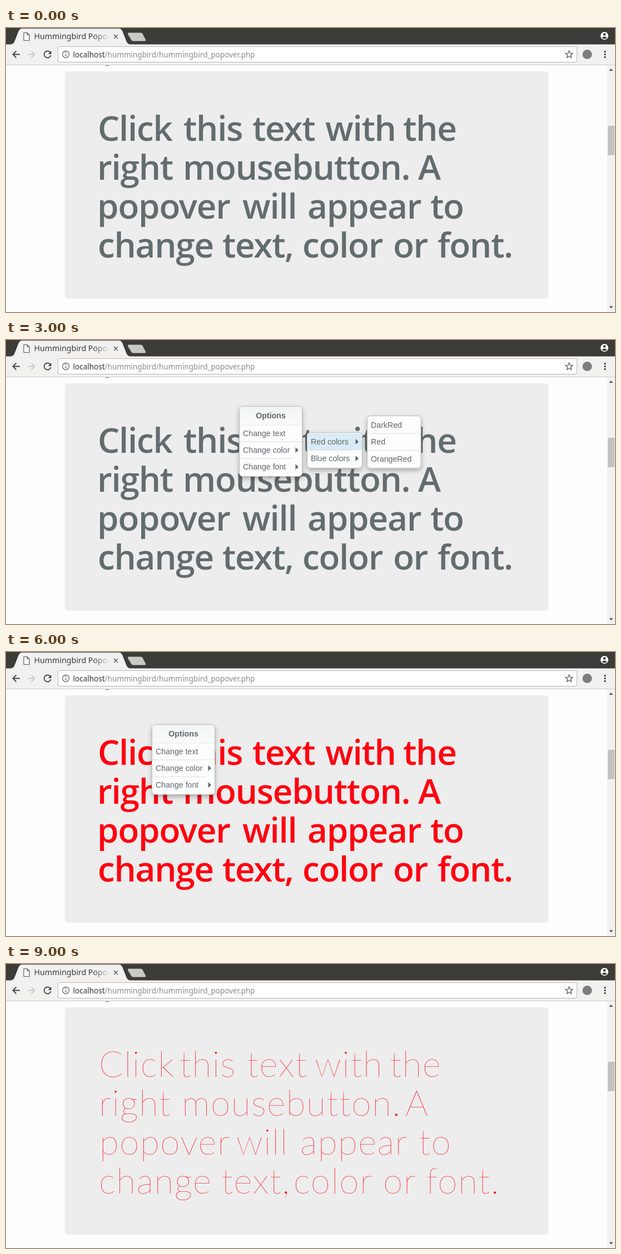
Write an HTML page that moves like this. It is 1095x511 px and loops after 10 s.

```html
<!DOCTYPE html>
<html lang="en">
<head>
<meta charset="utf-8">
<title>Popover demo</title>
<style>
  html, body { margin: 0; width: 100%; height: 100%; overflow: hidden; background: #fcfefd; }
  svg { display: block; width: 100%; height: 100%; }
  text { white-space: pre; }
  .ui { font-family: "Noto Sans", "Open Sans", sans-serif; }
  .menu text { font: 14.2px "Liberation Sans", Arial, sans-serif; fill: #60676b; }
  .menu .title { font-weight: 700; text-anchor: middle; }
  .medium { font: 600 62px "Open Sans", "Noto Sans", sans-serif; letter-spacing: -1.25px; }
  .thin { font: 100 64px Lato, "Noto Sans", sans-serif; letter-spacing: 1.5px; }
</style>
</head>
<body>
<svg id="stage" viewBox="0 0 1095 511" xmlns="http://www.w3.org/2000/svg">
  <defs>
    <linearGradient id="fade" gradientUnits="userSpaceOnUse" x1="158" y1="0" x2="187" y2="0">
      <stop offset="0" stop-color="#3a3a3a"/>
      <stop offset="1" stop-color="#3a3a3a" stop-opacity="0"/>
    </linearGradient>
    <linearGradient id="head" x1="0" y1="0" x2="0" y2="1">
      <stop offset="0" stop-color="#f3f4f4"/>
      <stop offset="1" stop-color="#f9fafa"/>
    </linearGradient>
    <filter id="drop" x="-20%" y="-20%" width="140%" height="150%">
      <feDropShadow dx="0" dy="4" stdDeviation="4" flood-color="#000" flood-opacity=".28"/>
    </filter>
    <filter id="soft" x="-100%" y="-50%" width="300%" height="200%">
      <feGaussianBlur stdDeviation="13"/>
    </filter>
  </defs>

  <!-- page -->
  <rect width="1095" height="511" fill="#fcfefd"/>
  <path d="M178 66.5q4 2 8 0" fill="none" stroke="#858b8e" stroke-width="1.5"/>
  <rect x="105.5" y="78" width="870" height="409" rx="6" fill="#ededed"/>
  <rect id="edge" x="-60" y="398" width="66" height="160" fill="#000" filter="url(#soft)"/>
  <g id="medium" class="medium"></g>
  <g id="thin" class="thin"></g>
  <g id="menus" class="menu"></g>

  <!-- scrollbar -->
  <rect x="1081" y="67" width="14" height="444" fill="#f1f1f1"/>
  <rect x="1082" y="176" width="12" height="53" fill="#c1c1c1"/>
  <path d="M1084.5 77h7l-3.500-4zM1084.5 500.500h7l-3.500 4z" fill="#505050"/>

  <!-- tab strip -->
  <rect width="1095" height="30" fill="#3d3c38"/>
  <path d="M8 30Q13 29 15 25L23 5Q25 1 29 1H203Q207 1 209 5L217 25Q219 29 224 30Z" fill="#f2f1f0"/>
  <path d="M221 8.500H242Q245 8.500 246 11L251 21Q252 23.500 249 23.500H229Q226 23.500 225 21L219 11Q218 8.500 221 8.500Z" fill="#cbc9c6"/>
  <path d="M32 8.500h6l4 4v10h-10zM38 8.500v4h4" fill="#fff" stroke="#5a5a5a" stroke-width="1.200"/>
  <text class="ui" x="50.500" y="20" font-size="14.2" fill="url(#fade)">Hummingbird Popo</text>
  <path d="M194 12l7 7m0-7l-7 7" stroke="#5a5a5a" stroke-width="1.400"/>
  <circle cx="1076" cy="14" r="7" fill="#fff"/>
  <circle cx="1076" cy="11.500" r="2.300" fill="#3d3c38"/>
  <path d="M1071.500 17.500q4.500-4 9 0q-4.500 4-9 0" fill="#3d3c38"/>

  <!-- toolbar -->
  <rect y="29.500" width="1095" height="36.500" fill="#f2f1f0"/>
  <rect y="66" width="1095" height="1" fill="#cfcecc"/>
  <g fill="none" stroke="#4a4a4a" stroke-width="1.900">
    <path d="M25 47.500H13M18.500 41.500l-6 6 6 6"/>
    <path d="M39 47.500H51M45.500 41.500l6 6-6 6" stroke="#cccac8"/>
    <path d="M79.500 44A6 6 0 1 0 80.500 49"/>
  </g>
  <path d="M81.500 41v6h-6z" fill="#4a4a4a"/>
  <rect x="93.500" y="33.500" width="933" height="28" rx="2.500" fill="#fff" stroke="#b8b6b3"/>
  <circle cx="107.500" cy="47.500" r="6" fill="none" stroke="#666" stroke-width="1.300"/>
  <path d="M107.500 46.500v4.500M107.500 43.500v1.600" stroke="#666" stroke-width="1.500"/>
  <text class="ui" x="120.500" y="53" font-size="13.5" fill="#333">localhost<tspan fill="#8b8b8b">/hummingbird/hummingbird_popover.php</tspan></text>
  <path id="star" fill="none" stroke="#5a5a5a" stroke-width="1.300"/>
  <circle cx="1045" cy="47.500" r="8.500" fill="#7d7d7d"/>
  <g fill="#4a4a4a">
    <circle cx="1077" cy="42.500" r="1.800"/><circle cx="1077" cy="47.500" r="1.800"/><circle cx="1077" cy="52.500" r="1.800"/>
  </g>
</svg>

<script>
const LOOP = 10000, STEP = 1000, ROW = 30.3;
const GREY = "#636c6f", RED = "#ff0010";
const $ = id => document.getElementById(id);

function add(parent, tag, attrs, content) {
  const el = document.createElementNS("http://www.w3.org/2000/svg", tag);
  for (const key in attrs) el.setAttribute(key, attrs[key]);
  if (content) el.textContent = content;
  parent.appendChild(el);
  return el;
}

// Heading: each word with the left edge of its ink in both weights.
const heading = [
  [["Click", 168, 171], ["this", 320, 314], ["text", 444, 435], ["with", 574, 557], ["the", 715, 692]],
  [["right", 169, 172], ["mousebutton.", 323, 321], ["A", 741, 719]],
  [["popover", 169, 173], ["will", 425, 416], ["appear", 544, 532], ["to", 764, 744]],
  [["change", 168, 170], ["text,", 390, 389], ["color", 536, 520], ["or", 699, 681], ["font.", 777, 756]]
];
const pen = document.createElement("canvas").getContext("2d");

function setHeading(id, column) {
  const group = $(id);
  pen.font = getComputedStyle(group).font;
  heading.forEach((line, row) => line.forEach(word => {
    const x = word[column] + pen.measureText(word[0]).actualBoundingBoxLeft;
    add(group, "text", { x, y: 203 + row * 70 }, word[0]);
  }));
}

// A label ending in ">" opens a submenu.
function menu(x, y, w, labels, title) {
  const g = add($("menus"), "g", { transform: `translate(${x} ${y})` });
  const top = title ? 33.2 : 1.5;
  const h = top + labels.length * ROW + 1.8;
  add(g, "rect", { width: w, height: h, rx: 6, fill: "#fcfdfd", stroke: "#b9bbbc", filter: "url(#drop)" });
  if (title) {
    add(g, "path", { d: `M.5 33V6Q.5.5 6 .5H${w - 6}Q${w - .5}.5 ${w - .5} 6V33Z`, fill: "url(#head)" });
    add(g, "rect", { x: .5, y: 33, width: w - 1, height: 1, fill: "#e8eaea" });
    add(g, "text", { class: "title", x: w / 2, y: 21 }, title);
  }
  const marks = labels.map((label, i) => {
    const rowY = top + i * ROW, nested = label.endsWith(">");
    const mark = add(g, "rect", { x: 1, y: rowY, width: w - 2, height: ROW, rx: 2, fill: "#d9ebf6" });
    if (i < labels.length - 1)
      add(g, "rect", { x: .5, y: rowY + ROW - .5, width: w - (nested ? 17 : 1), height: 1, fill: "#dcdfe0" });
    add(g, "text", { x: 6.5, y: rowY + 20 }, label.replace(">", ""));
    if (nested) add(g, "path", { d: `M${w - 12} ${rowY + 10}l5.500 5-5.500 5z`, fill: "#60676b" });
    return mark;
  });
  return hover => {
    g.style.display = hover === undefined ? "none" : "";
    marks.forEach((mark, i) => mark.style.display = i === hover ? "" : "none");
  };
}

setHeading("medium", 1);
setHeading("thin", 2);
$("star").setAttribute("d", "M" + Array.from({ length: 10 }, (_, i) => {
  const a = i * Math.PI / 5, r = i % 2 ? 3 : 6.8;
  return `${1012.5 + r * Math.sin(a)} ${47.8 - r * Math.cos(a)}`;
}).join("L") + "Z");

const options = ["Change text", "Change color>", "Change font>"];
const menus = {
  first: menu(419.5, 119.5, 113, options, "Options"),
  colors: menu(541.5, 166.5, 99, ["Red colors>", "Blue colors>"]),
  reds: menu(649.5, 136.5, 96.5, ["DarkRed", "Red", "OrangeRed"]),
  second: menu(262.5, 130.5, 113, options, "Options"),
  fonts: menu(384.5, 192.5, 67, ["bold", "normal", "lighter"])
};

// One entry per second: open menus with their highlighted row (-1 for none).
const scenes = [
  {},
  { first: -1 },
  { first: 1, colors: -1 },
  { first: -1, colors: 0, reds: -1 },
  { first: -1, colors: -1, reds: 1 },
  {},
  { second: -1 },
  { second: 2, fonts: -1 },
  { second: -1, fonts: 2 },
  {}
];

function draw(time) {
  const n = Math.floor(time % LOOP / STEP);
  for (const name in menus) menus[name](scenes[n][name]);
  $("medium").setAttribute("fill", n < 5 ? GREY : RED);
  $("thin").setAttribute("fill", RED);
  $("medium").style.display = n < 9 ? "" : "none";
  $("thin").style.display = n < 9 ? "none" : "";
  $("edge").setAttribute("opacity", n === 2 ? .5 : n === 1 ? .3 : 0);
}

const start = performance.now();
function tick() {
  draw(performance.now() - start);
  requestAnimationFrame(tick);
}
tick();
</script>
</body>
</html>
```
